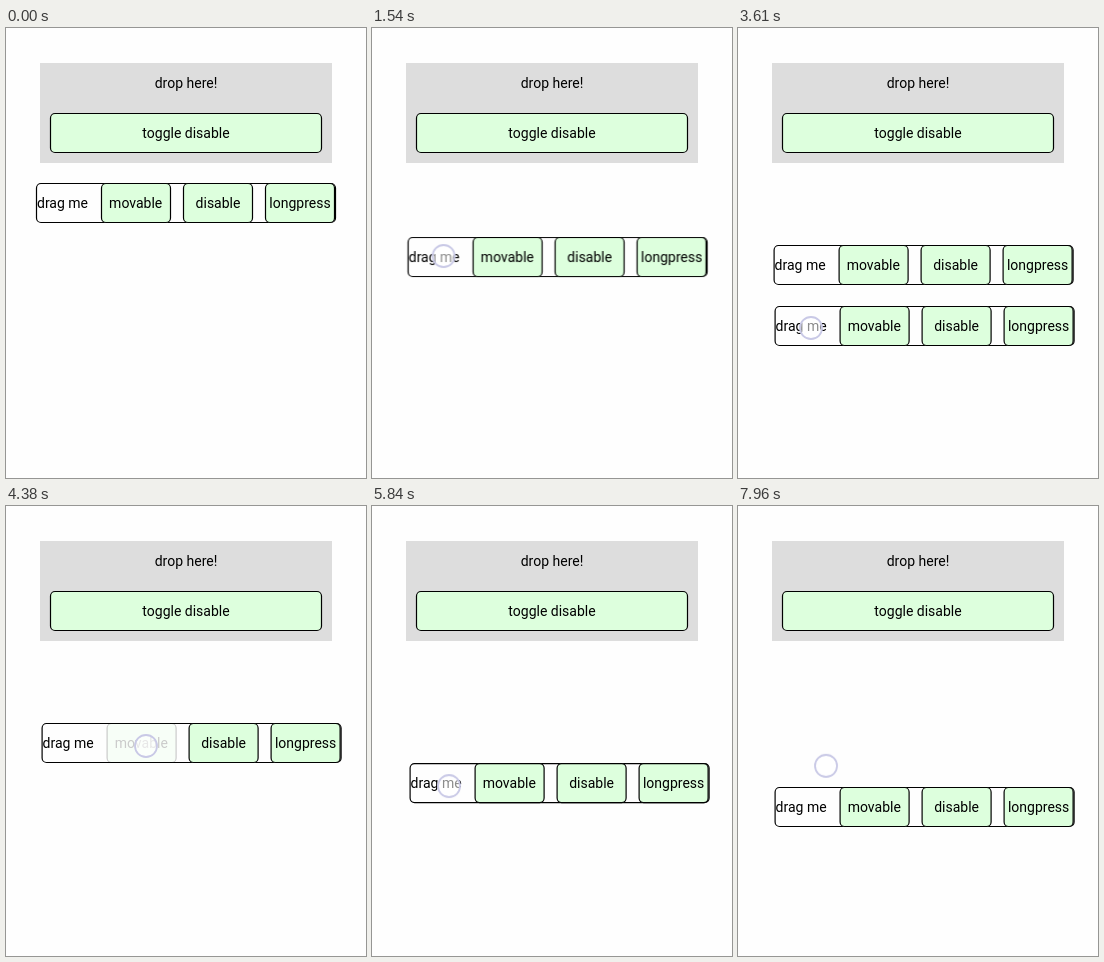
Recreate the animation shown at these times as an HTML page. Size 360 px wide and 450 px high, loop 7990 ms.

```html
<!DOCTYPE html>
<html lang="en">
<head>
<meta charset="utf-8">
<title>Drag and drop demo</title>
<style>
  html, body { margin: 0; width: 100%; height: 100%; overflow: hidden; background: #fefefe; }
  svg { display: block; width: 360px; height: 450px; }
  text { font: 14px Roboto, sans-serif; text-anchor: middle; fill: #000; }
  .box { fill: #fefefe; stroke: #000; stroke-width: 1.2; }
  .btn { fill: #dfd; }

  .anim { animation: 7990ms linear infinite; }
  .drag { animation-name: drag; }
  .ghost { animation-name: ghost; }
  .touch { animation-name: touch; fill: #fff; fill-opacity: .55; stroke: #c9c9e6; stroke-width: 1.8; }
  .movable { animation-name: movable; animation-timing-function: ease-in-out; }
  .disable { animation-name: disable; animation-timing-function: ease-in-out; }

  @keyframes drag {
    0%, 8.14% { transform: translate(0, 0); }
    10.64% { transform: translate(2px, 8px); }
    13.14% { transform: translate(4.5px, 30px); }
    15.39% { transform: translate(5.8px, 47px); }
    19.27% { transform: translate(5.6px, 54px); }
    22.28%, 67.33% { transform: translate(5.6px, 62px); }
    70% { transform: translate(6.4px, 76px); }
    73.09% { transform: translate(7.6px, 102px); }
    74.59% { transform: translate(7.8px, 109px); }
    78.22%, 100% { transform: translate(6.6px, 126px); }
  }

  /* While not movable, a copy follows the finger and then returns. */
  @keyframes ghost {
    0%, 39.41% { transform: translate(5.6px, 62px); visibility: hidden; }
    39.42% { transform: translate(5.6px, 62px); visibility: visible; }
    41% { transform: translate(6px, 82px); }
    43.8% { transform: translate(6.6px, 119px); }
    45.18%, 46.31% { transform: translate(6.6px, 123px); animation-timing-function: ease-out; }
    50.31% { transform: translate(5.6px, 62px); visibility: visible; }
    50.32%, 100% { transform: translate(5.6px, 62px); visibility: hidden; }
  }

  @keyframes touch {
    0%, 5.76% { transform: translate(66px, 174px); opacity: 0; }
    7.01%, 8.14% { transform: translate(66px, 174px); opacity: 1; }
    10.64% { transform: translate(68px, 182px); }
    13.14% { transform: translate(70.5px, 204px); }
    15.39% { transform: translate(71.8px, 221px); }
    19.27% { transform: translate(71.6px, 228px); }
    22.28%, 23.78% { transform: translate(71.6px, 236px); opacity: 1; }
    28.16% { transform: translate(71.6px, 236px); opacity: 0; }

    28.17%, 30.29% { transform: translate(134px, 240px); opacity: 0; }
    31.5%, 34.5% { transform: translate(134px, 240px); opacity: 1; }
    37.2% { transform: translate(134px, 240px); opacity: 0; }

    37.3% { transform: translate(72px, 239px); opacity: 0; }
    38.55%, 39.42% { transform: translate(72px, 239px); opacity: 1; }
    41% { transform: translate(72.4px, 259px); }
    43.8% { transform: translate(73px, 296px); }
    45.18%, 46.31% { transform: translate(73px, 300px); opacity: 1; }
    50.06% { transform: translate(73px, 300px); opacity: 0; }

    50.07%, 51.56% { transform: translate(140px, 240px); opacity: 0; }
    52.8%, 54.88% { transform: translate(140px, 240px); opacity: 1; }
    58.64% { transform: translate(140px, 240px); opacity: 0; }

    58.65%, 64.96% { transform: translate(75px, 240px); opacity: 0; }
    66.21%, 67.33% { transform: translate(75px, 240px); opacity: 1; }
    70% { transform: translate(75.8px, 254px); }
    73.09% { transform: translate(77px, 280px); }
    74.59% { transform: translate(77.2px, 287px); }
    78.22%, 79.47% { transform: translate(76px, 304px); opacity: 1; }
    83.23% { transform: translate(76px, 304px); opacity: 0; }

    83.24%, 84.73% { transform: translate(228px, 303px); opacity: 0; }
    86%, 88.49% { transform: translate(228px, 303px); opacity: 1; }
    92.1% { transform: translate(228px, 303px); opacity: 0; }

    92.12% { transform: translate(73px, 300px); opacity: 0; }
    93.37%, 94.37% { transform: translate(73px, 300px); opacity: 1; }
    98.12% { transform: translate(85px, 273px); }
    99.62% { transform: translate(88px, 260px); }
    100% { transform: translate(88.5px, 257px); opacity: 1; }
  }

  @keyframes movable {
    0%, 30.29% { opacity: 1; }
    32.17%, 34.79% { opacity: .2; }
    37.92%, 51.56% { opacity: 1; }
    53.44%, 54.88% { opacity: .2; }
    58.01%, 100% { opacity: 1; }
  }

  @keyframes disable {
    0%, 84.73% { opacity: 1; }
    86.61%, 88.49% { opacity: .2; }
    91.61%, 100% { opacity: 1; }
  }
</style>
</head>
<body>
<svg viewBox="0 0 360 450">
  <defs>
    <rect id="key" x="-34.5" y="155.5" width="69" height="39" rx="4.5"/>
  </defs>

  <rect x="34" y="35" width="292" height="100" fill="#ddd"/>
  <text x="180" y="60">drop here!</text>
  <rect class="box btn" x="44.5" y="85.5" width="271" height="39" rx="4.5"/>
  <text x="180" y="110">toggle disable</text>

  <g class="anim drag">
    <rect class="box" x="30.5" y="155.5" width="299" height="39" rx="4.5"/>
    <text x="56.5" y="180">drag me</text>
    <g class="anim movable"><use href="#key" x="130" class="box btn"/><text x="129.7" y="180">movable</text></g>
    <g class="anim disable"><use href="#key" x="212" class="box btn"/><text x="212" y="180">disable</text></g>
    <use href="#key" x="294" class="box btn"/><text x="294" y="180">longpress</text>
  </g>

  <g class="anim ghost">
    <rect class="box" x="30.5" y="155.5" width="299" height="39" rx="4.5"/>
    <text x="56.5" y="180">drag me</text>
    <use href="#key" x="130" class="box btn"/><text x="129.7" y="180">movable</text>
    <use href="#key" x="212" class="box btn"/><text x="212" y="180">disable</text>
    <use href="#key" x="294" class="box btn"/><text x="294" y="180">longpress</text>
  </g>

  <circle class="anim touch" r="11"/>
</svg>
</body>
</html>
```
